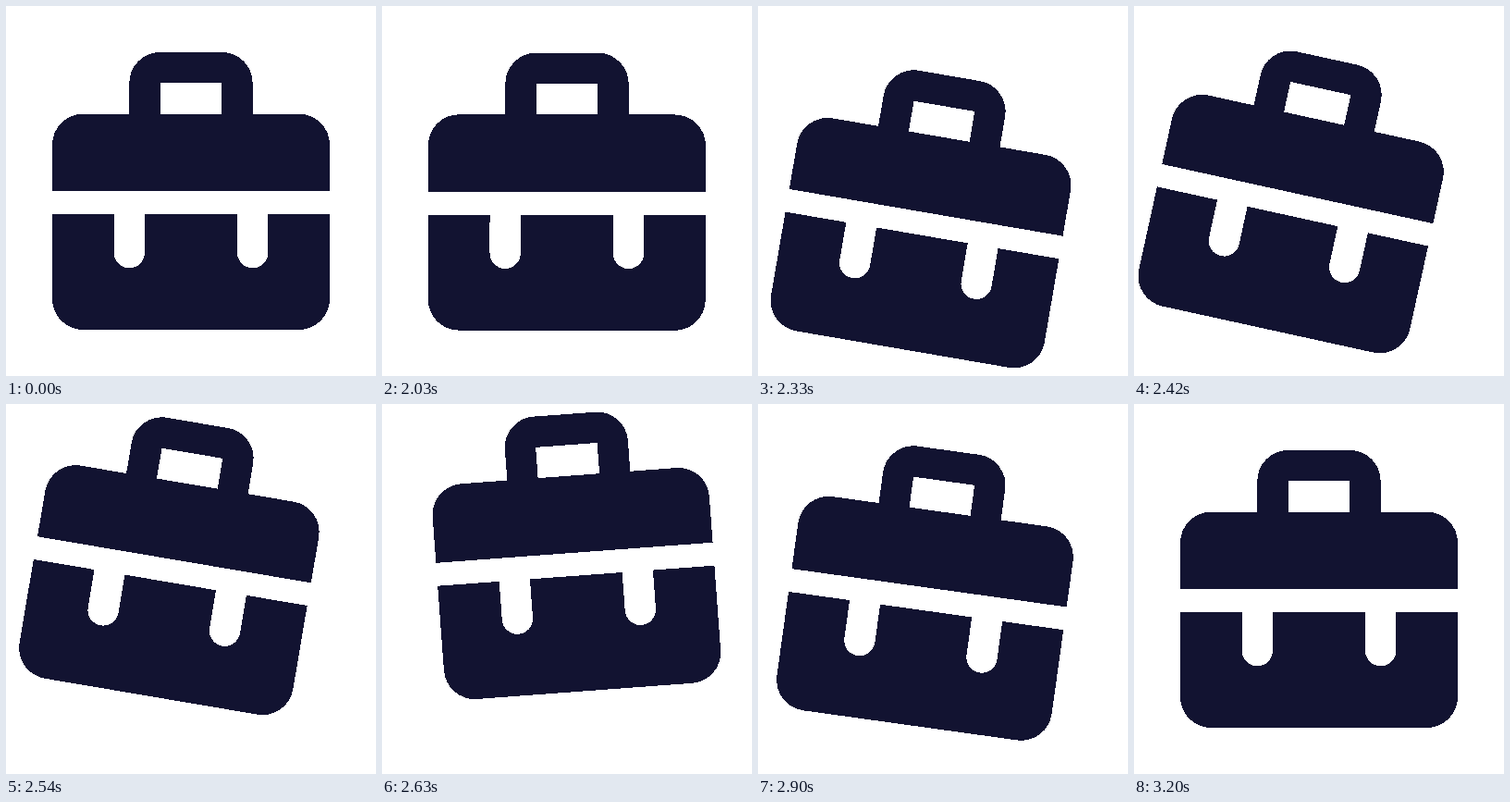
Animation, 400 px wide and 400 px high, one loop 3260 ms. Source, as an HTML page:

```html
<!DOCTYPE html>
<html>
<head>
<meta charset="utf-8">
<title>Briefcase</title>
<style>
  html, body { margin: 0; height: 100%; overflow: hidden; background: #fff; }
  svg { display: block; width: 100%; height: 100%; }
  .ink { fill: #121331; }
  .handle { fill: none; stroke: #121331; stroke-width: 2; }
  .cut { fill: #fff; }
</style>
</head>
<body>
<svg viewBox="0 0 24 24" shape-rendering="crispEdges">
  <g id="case">
    <rect class="handle" x="9" y="4" width="6" height="6" rx="1"/>
    <rect class="ink" x="3" y="7" width="18" height="14" rx="2"/>
    <rect class="cut" x="2.9" y="12" width="18.2" height="1.5"/>
    <rect class="cut" x="7" y="12" width="2" height="5" rx="1"/>
    <rect class="cut" x="15" y="12" width="2" height="5" rx="1"/>
  </g>
</svg>
<script>
  const LOOP = 3260, REST = 2000, STEP = 30, LAST = 40;
  const briefcase = document.getElementById('case');

  // Smooth progress from 0 to 1 between two steps.
  function ease(step, from, to) {
    const u = Math.min(1, Math.max(0, (step - from) / (to - from)));
    return u * u * (3 - 2 * u);
  }

  // Swings right, left, right again, then settles.
  const angleAt = step =>
    13.05 * ease(step, 0.4, 16.2) - 26.65 * ease(step, 16.2, 24.2) +
    23.6 * ease(step, 24.2, 31.3) - 10 * ease(step, 31.3, LAST);

  // Dips, jumps up and lands.
  const dropAt = step =>
    1.56 * ease(step, 0, 10.2) - 3.92 * ease(step, 10.2, 20.4) + 2.36 * ease(step, 20.4, 30.4);

  function draw() {
    const time = performance.now() % LOOP;
    const step = Math.min(LAST, Math.max(0, Math.floor((time - REST) / STEP)));
    briefcase.setAttribute('transform',
      `translate(0 ${dropAt(step)}) rotate(${angleAt(step)} 12 5.5)`);
    requestAnimationFrame(draw);
  }
  draw();
</script>
</body>
</html>
```
